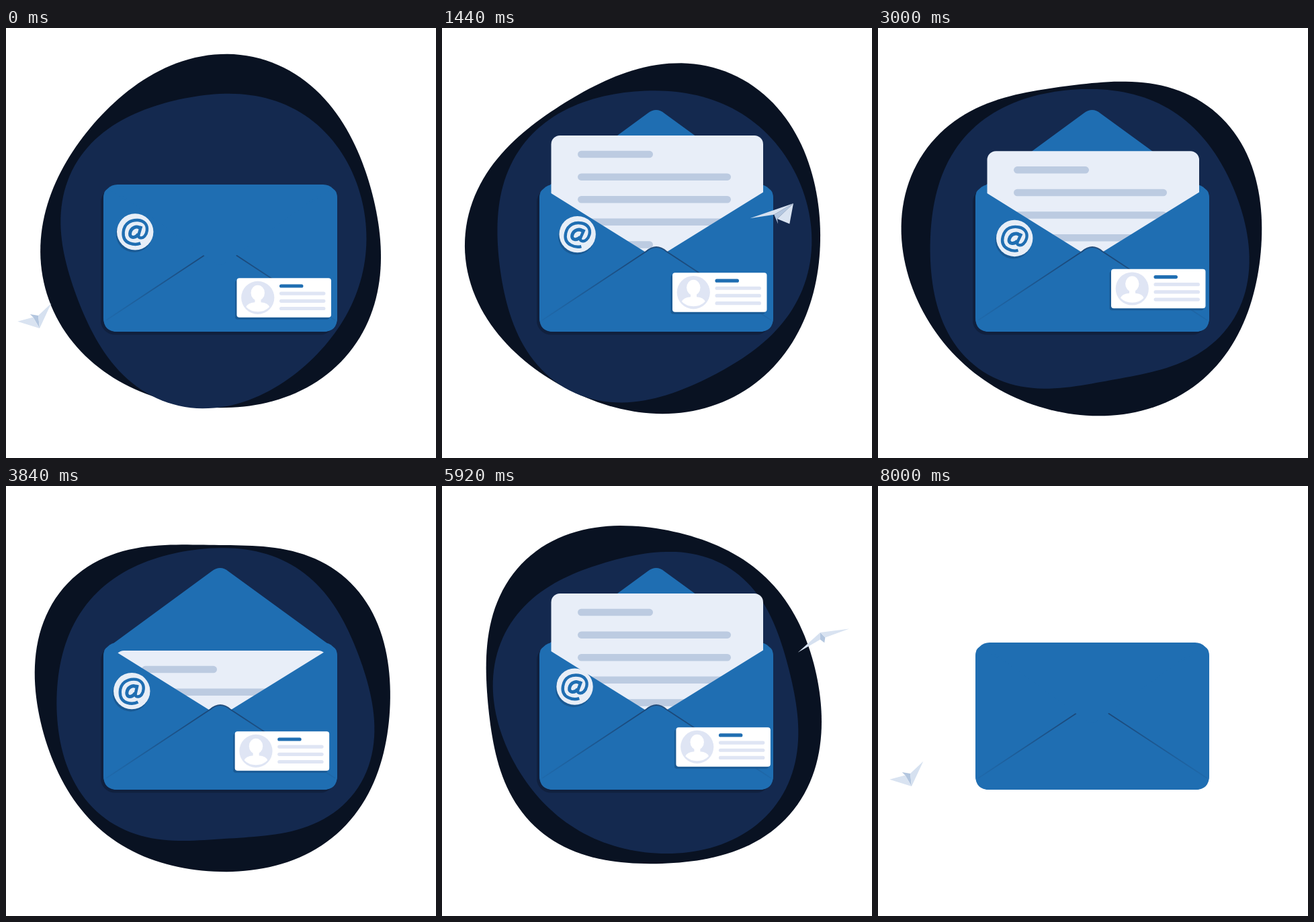
Write an HTML page with a canvas that moves like this. It is 640x640 px and loops after 8.04 s.

```html
<!DOCTYPE html>
<html>
<head>
<meta charset="utf-8">
<style>
html, body { margin: 0; width: 100%; height: 100%; overflow: hidden; background: #fff; }
canvas { display: block; }
</style>
</head>
<body>
<canvas id="stage" width="640" height="640"></canvas>
<script>
const ctx = document.getElementById('stage').getContext('2d');
const LOOP = 8040, BLUE = '#1f6eb2', SHADE = '#195a95', PALE = '#dfe5f4';

const rad = deg => deg * Math.PI / 180;
const cos = deg => Math.cos(rad(deg));
const sin = deg => Math.sin(rad(deg));
const clamp = x => Math.min(1, Math.max(0, x));
const ease = (t, from, to) => (1 - cos(180 * clamp((t - from) / (to - from)))) / 2;

// Blob radius at angle a; p is the loop phase in degrees. Two- and three-lobed waves travel round.
const outer = (a, p) => 258.5 + 3 * cos(p - 110)
  + (1.2 + 6.5 * cos(p - 155)) * sin(a)
  + 3.4 * cos(2 * a - 47) + 8.5 * cos(2 * a - p + 150)
  - 3 * cos(3 * a) + 8.5 * cos(3 * a - p + 252)
  + (4.8 * cos(p - 40) - 3.5) * cos(4 * a) + sin(4 * a);
const inner = (a, p) => 230.5 + 4 * cos(p - 95)
  + (5.8 + 4 * cos(p + 35)) * sin(a) - cos(a)
  + 2.6 * cos(2 * a - 18) + 6.3 * cos(2 * a - p + 158)
  + 8 * cos(3 * a - p + 85)
  + (3 * cos(p + 10) - 3) * cos(4 * a) + 4 * sin(4 * a);

function fill(path, color) {
  ctx.fillStyle = color;
  ctx.fill(new Path2D(path));
}

function box(x, y, w, h, r, color) {
  ctx.fillStyle = color;
  ctx.beginPath();
  ctx.roundRect(x, y, w, h, r);
  ctx.fill();
}

function oval(x, y, rx, ry, color) {
  ctx.fillStyle = color;
  ctx.beginPath();
  ctx.ellipse(x, y, rx, ry, 0, 0, 7);
  ctx.fill();
}

function blob(radius, phase, color) {
  ctx.fillStyle = color;
  ctx.beginPath();
  for (let a = 0; a < 360; a += 2) {
    const r = radius(a, phase);
    ctx.lineTo(310 + r * cos(a), 315 + r * sin(a));
  }
  ctx.fill();
}

function flap(s) {
  ctx.save();
  ctx.translate(0, 237);
  ctx.scale(1, s);
  fill('M156 0L306 -110Q319 -120 331 -110L482 0Z', BLUE);
  ctx.restore();
}

function letter(t) {
  const top = 290 - 130 * ease(t, 350, 1200) + 85 * ease(t, 2600, 3740)
    - 85 * ease(t, 4275, 5300) + 130 * ease(t, 6900, 7600);
  box(162.5, top, 315.5, 440 - top, [13, 13, 0, 0], '#e8eef8');
  const second = t >= 4000, start = second ? 4950 : 850;
  for (let i = 0; i < 5; i++) {
    const short = i === 0 || i === 4 && !second;
    const len = (short ? 112 : 228) * ease(t, start + i * 80, start + i * 80 + 250);
    const y = top + 22.8 + i * 33.6;
    if (len > 1 && y < 430) box(202, y, len, 10.5, 5.25, '#bccbe1');
  }
}

function pocket() {
  fill('M145 254Q145 241 152 239.5L302 333Q319 319 335 333L486 239.5Q493 241 493 254'
    + 'V431Q493 452 472 452H166Q145 452 145 431Z', BLUE);
  const crease = ctx.createLinearGradient(150, 0, 490, 0);
  for (const [at, alpha] of [[0, .1], [.42, .85], [.58, .85], [1, .1]])
    crease.addColorStop(at, `rgba(26,66,112,${alpha})`);
  ctx.strokeStyle = crease;
  ctx.lineWidth = 1.8;
  ctx.stroke(new Path2D('M149 435L304 332.5Q319 319.5 334 332.5L490 435'));
}

function badge(p) {
  const x = 196 - 10 * cos(2 * p - 40) + 6 * cos(p - 50);
  const y = 303 + 8 * cos(p - 100) + 3.5 * cos(3 * p - 60);
  ctx.save();
  ctx.translate(x, y);
  oval(-1.5, 3.5, 27, 27, SHADE);
  oval(0, 0, 27.2, 27.2, '#e7eef7');
  ctx.rotate(rad((x - 188) * .8));
  ctx.strokeStyle = BLUE;
  ctx.lineWidth = 4.4;
  ctx.stroke(new Path2D('M9 16.5C2 20 -18 20.5 -17.5 1.5C-17 -13 -6 -17.5 3 -17.5'
    + 'C13 -17.5 18 -11 17.5 -3C17 4 13 8.5 9 8.5C5 8.5 5 6 5.7 3L8.5 -9'));
  ctx.lineWidth = 5;
  ctx.stroke(new Path2D('M6.5 -6C2 -9.5 -7 -6 -7.5 3C-7.8 10 1 10 5 3'));
  ctx.restore();
}

function card(p) {
  ctx.save();
  ctx.translate(344 - 2.5 * cos(2 * p - 10) + 2.5 * cos(3 * p - 40),
    364 + 6 * cos(2 * p - 30) + 3 * cos(p));
  box(-2.5, 3, 140.5, 58.5, 4, SHADE);
  box(0, 0, 140.5, 58.5, 4, '#fff');
  oval(31.3, 29.2, 24.6, 24.6, PALE);
  oval(31.3, 22, 10.2, 11.5, '#fff');
  fill('M27 29H36V36Q47 37 48.5 43Q42 50 31.3 50T14 43Q16 37 27 36Z', '#fff');
  box(63.5, 9.2, 35.5, 5.2, 2.6, BLUE);
  for (let i = 0; i < 3; i++) box(63.5, 20.3 + i * 11.2, 68.5, 5.2, 2.6, PALE);
  ctx.restore();
}

// Key poses of the paper plane; wings are skewed and foreshortened as it banks.
const poses = [
  { t: 0, x: 50, y: 447, turn: 72, len: 25, span: 28, skew: -5 },
  { t: 720, x: 240, y: 394, turn: -5, len: 67, span: 20, skew: 17 },
  { t: 1440, x: 523, y: 261, turn: -37, len: 44, span: 21, skew: -21 },
  { t: 1920, x: 563, y: 218, turn: -112, len: 13, span: 42, skew: -2 }];

function pose(t, key) {
  const last = poses.length - 1;
  const i = Math.max(0, poses.findLastIndex((q, n) => n < last && t >= q.t));
  const a = poses[i], b = poses[i + 1], d = b.t - a.t, u = (t - a.t) / d;
  const slope = n => n % last === 0 ? 0
    : d * (poses[n + 1][key] - poses[n - 1][key]) / (poses[n + 1].t - poses[n - 1].t);
  const m = slope(i), n = slope(i + 1), gap = b[key] - a[key];
  return a[key] + u * m + u * u * (3 * gap - 2 * m - n) + u * u * u * (m + n - 2 * gap);
}

function plane(t) {
  const [x, y, turn, len, span, skew] = ['x', 'y', 'turn', 'len', 'span', 'skew'].map(k => pose(t, k));
  const left = [skew - len, -span], right = [-skew - len, span];
  const keel = [-8 - .65 * len, (42 - span) / 2];
  const fold = -.75 * len;
  ctx.save();
  ctx.translate(x, y);
  ctx.rotate(rad(turn));
  const facet = (color, ...points) => fill('M0 0L' + points.join('L') + 'Z', color);
  facet('#b3c6df', [fold, -4], keel, [fold, 4]);
  facet('#d6e1f0', left, [fold, -4]);
  facet('#d9e3f1', right, [fold, 4]);
  ctx.restore();
}

function draw(t) {
  const phase = 360 * t / LOOP, scene = t < 8000;
  ctx.fillStyle = '#fff';
  ctx.fillRect(0, 0, 640, 640);
  if (scene) {
    blob(outer, phase, '#091222');
    blob(inner, phase, '#14294f');
    box(141, 238, 348, 218.5, 21, '#10203e');
  }
  const open = 2 * (ease(t, 80, 560) - ease(t, 7400, 7920)) - 1;
  box(145, 233, 348, 219, 21, BLUE);
  if (open > 0) flap(open);
  letter(t);
  pocket();
  if (open <= 0) flap(open);
  if (scene) {
    badge(phase);
    card(phase);
  }
  if (t % 4000 <= 1920) plane(t % 4000);
}

const begin = performance.now();
function tick() {
  draw(Math.floor((performance.now() - begin) % LOOP / 40) * 40);
  requestAnimationFrame(tick);
}
tick();
</script>
</body>
</html>
```
